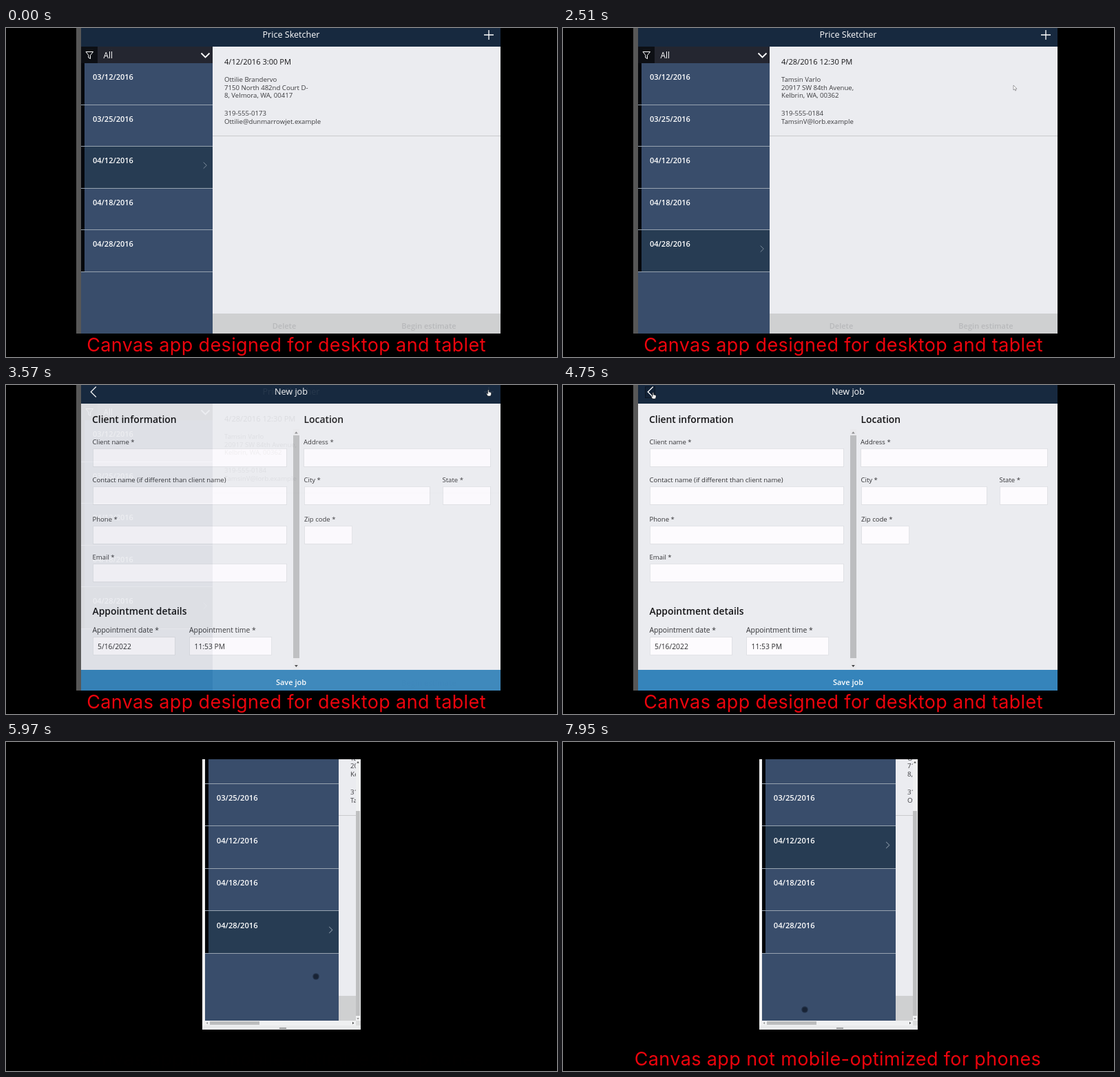
These frames come from a looping animation (800 by 477 pixels, 8 s). An HTML page:

```html
<!DOCTYPE html>
<html lang="en">
<head>
<meta charset="utf-8">
<title>Canvas app on desktop and phone</title>
<style>
  html, body { margin: 0; width: 100%; height: 100%; overflow: hidden; background: #000; }
  svg { display: block; width: 100vw; height: 100vh; }
  rect { shape-rendering: crispEdges; }
  text { font-family: "Open Sans", "Noto Sans", sans-serif; white-space: pre; }
  .caption { font: 400 27px Inter, sans-serif; letter-spacing: .37px; fill: #ec040d; }
</style>
</head>
<body>
<svg id="stage" viewBox="0 0 800 477" xmlns="http://www.w3.org/2000/svg"></svg>
<script>
const LOOP = 8000;
const PHONE_AT = 5970;
const stage = document.getElementById('stage');

function el(parent, tag, attrs = {}, text) {
  const node = document.createElementNS('http://www.w3.org/2000/svg', tag);
  for (const key in attrs) node.setAttribute(key, attrs[key]);
  if (text !== undefined) node.textContent = text;
  parent.appendChild(node);
  return node;
}
const group = parent => el(parent, 'g');
const rect = (parent, x, y, width, height, fill, more) =>
  el(parent, 'rect', { x, y, width, height, fill, ...more });
const line = (parent, d, stroke, width) =>
  el(parent, 'path', { d, stroke, 'stroke-width': width, fill: 'none' });
const shape = (parent, d, fill, more) => el(parent, 'path', { d, fill, ...more });
const label = (parent, x, y, size, text, fill = '#333', more) =>
  el(parent, 'text', { x, y, 'font-size': size, fill, ...more }, text);

const CENTER = { 'text-anchor': 'middle' };
const SEMI = { 'font-weight': 600 };
const NAVY = '#17293f', PAPER = '#ebecf0', ROW = '#394d6b', ROW_ON = '#273c53';
const ROW_TOP = 51, ROW_H = 60.5;
const dates = ['03/12/2016', '03/25/2016', '04/12/2016', '04/18/2016', '04/28/2016'];
const details = {
  2: ['4/12/2016 3:00 PM', 'Ottilie Brandervo', '7150 North 482nd Court D-',
      '8, Velmora, WA, 00417', '319-555-0173', 'Ottilie@dunmarrowjet.example'],
  3: ['4/18/2016 9:00 AM', 'Jorun Pellavey', '5208 West 61st Avenue,',
      'Ostrell, WA, 00291', '319-555-0192', 'Jorun@tolvane.example'],
  4: ['4/28/2016 12:30 PM', 'Tamsin Varlo', '20917 SW 84th Avenue,',
      'Kelbrin, WA, 00362', '319-555-0184', 'TamsinV@lorb.example']
};

const defs = el(stage, 'defs');
const clipRect = rect(el(defs, 'clipPath', { id: 'view' }), 0, 0, 1, 1);

rect(stage, 0, 0, 800, 477, '#000');
const strip = rect(stage, 102, 0, 8, 443, '#575757');
const phoneBack = group(stage);
const view = el(stage, 'g', { 'clip-path': 'url(#view)' });
const app = group(view);
const form = group(view);
const phoneBars = group(stage);

// List screen, taller than the desktop view because the phone shows more of it
rect(app, 109, 0, 609, 460, PAPER);
rect(app, 109, 0, 609, 27.4, NAVY);
label(app, 414, 14.3, 12.6, 'Price Sketcher', '#fff', CENTER);
line(app, 'M694 10H708M701 3V17', '#fff', 1.3);
rect(app, 109, 27.4, 191, 433, ROW);
rect(app, 109, 27.4, 191, 23.6, '#242630');
rect(app, 109, 27.4, 24, 23.6, '#0d0f14');
line(app, 'M116 34.5H126.5L122.5 39.5V44.5L119.8 43V39.5Z', '#fff', 1);
label(app, 141.5, 43.6, 11.8, 'All', '#fff');
line(app, 'M283.5 36.5L289.5 42.5L295.5 36.5', '#fff', 1.8);
const highlight = rect(app, 109, 0, 191, ROW_H, ROW_ON);
rect(app, 109, ROW_TOP, 5, ROW_H * 5, '#05070b');
dates.forEach((date, i) => {
  const y = ROW_TOP + ROW_H * i;
  label(app, 126, y + 24.3, 11, date, '#fff', SEMI);
  rect(app, 109, y + ROW_H - .8, 191, 1, '#97a3b0');
});
const arrow = line(app, 'M286.7 -4.5L291.3 0L286.7 4.5', '#7c8b9b', 1);
const info = [53.4, 78.3, 89.6, 101.1, 126.8, 138.6].map((y, i) =>
  label(app, 317, y, i ? 9.6 : 11.1, '', i ? '#3c3c3f' : '#18181a'));
rect(app, 300, 156, 418, 1, '#c9cacd');
rect(app, 300, 413.7, 418, 46.3, '#cfd0d1');
label(app, 404, 435.8, 11, 'Delete', '#b8b9bb', { ...CENTER, ...SEMI });
label(app, 614, 435.8, 11, 'Begin estimate', '#b8b9bb', { ...CENTER, ...SEMI });

// Form screen
rect(form, 109, 0, 609, 443, PAPER);
rect(form, 109, 0, 609, 27.4, NAVY);
const backHover = rect(form, 119.5, 2.5, 14, 16, '#122236', { stroke: '#0b1623' });
line(form, 'M130.8 2.5L123.2 10L130.8 17.5', '#fff', 1.3);
label(form, 414, 14.3, 12.6, 'New job', '#fff', CENTER);
for (const [x, y, text] of [
  [125, 55, 'Client information'], [432.5, 55, 'Location'], [125.5, 332.6, 'Appointment details']
]) label(form, x, y, 13.9, text, '#141416', SEMI);

for (const [x, y, width, text] of [
  [126, 92, 281, 'Client name *'],
  [126, 147, 281, 'Contact name (if different than client name)'],
  [126, 204, 281, 'Phone *'],
  [126, 259, 281, 'Email *'],
  [432.5, 92, 270.5, 'Address *'],
  [433, 147, 182, 'City *'],
  [634, 147, 69, 'State *'],
  [433.5, 204, 69, 'Zip code *']
]) field(x, y, width, text, 9.55, 6);
field(126, 365.5, 119, 'Appointment date *', 10.4, 6.3, '5/16/2022');
field(266.5, 365.5, 119, 'Appointment time *', 10.4, 6.3, '11:53 PM');

function field(x, y, width, text, size, gap, value) {
  label(form, x - .5, y - gap, size, text, '#333336');
  rect(form, x, y, width, 26.3, '#fdfbfe', { stroke: '#dedfe3', 'stroke-width': .8 });
  if (value) label(form, x + 7, y + 17.2, 10.3, value, '#2c2c2e');
}
rect(form, 417, 64, 9, 349, '#e9e9ec');
rect(form, 417, 73, 8.7, 323, '#bcbdbf');
shape(form, 'M419 70.5L421.4 67.5L423.8 70.5Z', '#8b8b8d');
shape(form, 'M419 406L421.4 409L423.8 406Z', '#444');
rect(form, 109, 413.3, 609, 29.7, '#3584bb');
label(form, 414, 435.2, 11, 'Save job', '#fff', { ...CENTER, ...SEMI });

// Phone frame and scroll bars
rect(phoneBack, 285, 25, 230, 392, '#f1f2f3');
rect(phoneBars, 508, 25, 7, 379, '#eff0f1');
rect(phoneBars, 508, 100, 6, 297, '#bfc0c1');
rect(phoneBars, 289, 404, 219, 7, '#eff0f1');
rect(phoneBars, 296, 405, 72, 5, '#bcbdbe');
rect(phoneBars, 508, 404, 7, 7, '#dcdddd');
shape(phoneBars, 'M509.2 30.5L511 28L512.8 30.5Z', '#444');
shape(phoneBars, 'M509.2 400L511 402.5L512.8 400Z', '#999');
shape(phoneBars, 'M293 405.7L290.7 407.5L293 409.3Z', '#999');
shape(phoneBars, 'M503 405.7L505.3 407.5L503 409.3Z', '#444');
rect(phoneBars, 285, 411, 230, 6, '#e9eaeb');
rect(phoneBars, 397, 414, 10, 2, '#9b9c9d');

// Captions and pointers
const captions = [[407, 'Canvas app designed for desktop and tablet'],
  [399, 'Canvas app not mobile-optimized for phones']].map(([x, text]) =>
  el(stage, 'text', { x, y: 469, class: 'caption', ...CENTER }, text));
const pointer = shape(stage, 'M0 0V7L1.6 5.6L2.7 8L3.9 7.5L2.8 5.2H5Z', '#fff',
  { stroke: '#6a6a6e', 'stroke-width': .6 });
const hand = shape(stage, 'M-.8 0H.6V3L4 4V6.5L3 9H-1L-3 5.6L-2 5L-.8 6Z', '#fff',
  { stroke: '#111', 'stroke-width': .5 });
const dot = group(stage);
el(dot, 'circle', { r: 4.8, fill: '#111b2b', opacity: .5 });
el(dot, 'circle', { r: 3.6, fill: '#131c2c', opacity: .7 });

// Tables: time, then values
const mousePath = [[910, 466, 52], [1150, 400, 400], [1440, 244, 262], [1760, 244, 262],
  [2130, 243, 321], [2290, 243, 321], [2510, 654, 83], [2700, 700.5, 7], [3640, 700.5, 7],
  [4210, 238, 172], [4270, 238, 172], [4650, 131, 11], [5150, 131, 11], [5390, 177, 22],
  [5600, 190, 60]];
const dotPath = [[5970, 450, 340], [6510, 404.5, 299], [6770, 409, 302], [6830, 409, 302],
  [7150, 374, 213], [7360, 374, 213], [7570, 365, 155], [7730, 365, 155], [7950, 351, 388]];
const formFade = [[3190, 0], [3200, .06], [3400, .06], [3570, .93], [3640, 1], [5120, 1], [5560, 0]];
const captionFades = [[[5450, 1], [5600, 0]], [[5970, 0], [6250, 1]]];
const picks = [[0, 2], [1760, 3], [2290, 4], [7360, 3], [7730, 2]];

function sample(track, t, ease = u => u) {
  if (t <= track[0][0]) return track[0].slice(1);
  const i = track.findIndex(k => k[0] > t);
  if (i < 0) return track[track.length - 1].slice(1);
  const a = track[i - 1], b = track[i];
  const u = ease((t - a[0]) / (b[0] - a[0]));
  return a.slice(1).map((v, n) => v + (b[n + 1] - v) * u);
}
const smooth = u => u * u * (3 - 2 * u);
const show = (node, on) => node.setAttribute('visibility', on ? 'visible' : 'hidden');
const move = (node, [x, y]) => node.setAttribute('transform', `translate(${x} ${y})`);

let picked;
function pick(i) {
  if (i === picked) return;
  picked = i;
  const y = ROW_TOP + ROW_H * i;
  highlight.setAttribute('y', y);
  move(arrow, [0, y + 27.2]);
  info.forEach((node, n) => { node.textContent = details[i][n]; });
}

function setView(x, y, width, height, transform) {
  const box = { x, y, width, height };
  for (const key in box) clipRect.setAttribute(key, box[key]);
  app.setAttribute('transform', transform);
}

function render(t) {
  const phone = t >= PHONE_AT;
  if (phone) setView(289, 25, 219, 379, 'translate(177.7 -53) scale(1.0165)');
  else setView(109, 0, 609, 443, 'scale(1)');
  show(strip, !phone);
  show(phoneBack, phone);
  show(phoneBars, phone);
  pick(picks.filter(p => p[0] <= t).pop()[1]);

  const fade = sample(formFade, t)[0];
  form.setAttribute('opacity', fade);
  form.setAttribute('display', fade ? 'inline' : 'none');
  show(backHover, t >= 4600 && t < 5150);
  captions.forEach((node, i) => node.setAttribute('opacity', sample(captionFades[i], t)[0]));

  const clicking = (t >= 2650 && t < 3700) || (t >= 4600 && t < 5200);
  const mouse = t >= 910 && !phone;
  show(pointer, mouse && !clicking);
  show(hand, mouse && clicking);
  show(dot, phone);
  const spot = sample(mousePath, t, smooth);
  move(pointer, spot);
  move(hand, spot);
  move(dot, sample(dotPath, t, smooth));
}

const start = performance.now();
function tick() {
  render((performance.now() - start) % LOOP);
  requestAnimationFrame(tick);
}
tick();
</script>
</body>
</html>
```
